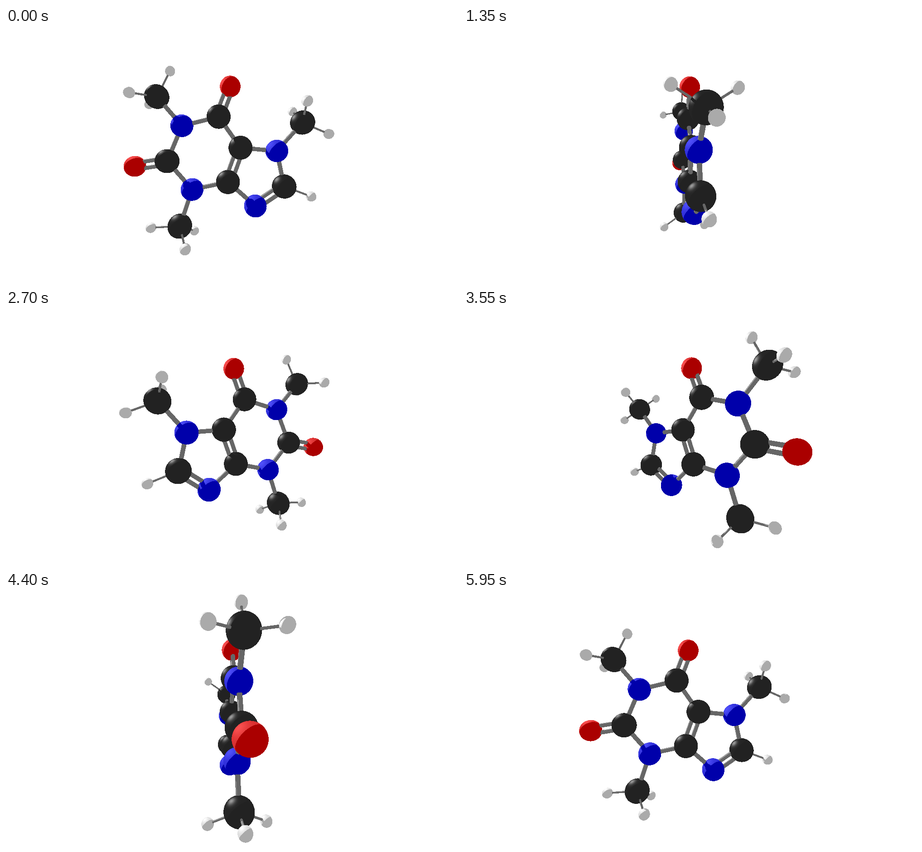
An HTML page with a canvas for the animation above (6000 ms loop, 998x561 px).

```html
<!DOCTYPE html>
<html lang="en">
<head>
<meta charset="utf-8">
<title>Rotating molecule</title>
<style>
html, body { margin: 0; width: 100%; height: 100%; overflow: hidden; background: #fff; }
canvas { display: block; }
</style>
</head>
<body>
<canvas id="stage" width="998" height="561"></canvas>
<script>
const W = 998, H = 561, LOOP = 6000, STEP = 50;
const FOCAL = 486;
const EYE = [0, 0, FOCAL];
const ctx = document.getElementById('stage').getContext('2d');
const image = ctx.createImageData(W, H);
const depth = new Float32Array(W * H);
const owner = new Uint8Array(W * H);

// rgb: shadow colour; flat and gloss: light added where lit
const MATERIAL = {
  C: { r: 26.4, rgb: [34, 34, 34], flat: 3, gloss: 120, power: 24 },
  N: { r: 24.7, rgb: [0, 0, 170], flat: 48, gloss: 32, power: 6 },
  O: { r: 22.8, rgb: [170, 0, 0], flat: 48, gloss: 32, power: 6 },
  H: { r: 11, rgb: [170, 170, 170], flat: 50, gloss: 35, power: 6 },
  bond: { rgb: [102, 102, 102], flat: 20, gloss: 50, power: 6 }
};

const ATOMS = {
  N1: [-110.5, 64.5, 0], C2: [-143, -13.5, 0], N3: [-88, -76, 0],
  C4: [-9, -59.5, 0], C5: [18.7, 16, 0], C6: [-29.5, 84.5, 0],
  N7: [98.7, 9, 0], C8: [115, -69.3, 0], N9: [51.5, -112.3, 0],
  O2: [-214, -25, 0], O6: [-4, 151, 0],
  Ca: [-165.7, 128.7, 0], Cb: [-115, -156.7, 0], Cc: [155.5, 71.5, 0],
  H8: [174.5, -91.5, 0],
  Ha1: [-137, 185.5, 0], Ha2: [-203, 123.5, 52], Ha3: [-203, 123.5, -52],
  Hb1: [-179, -160.5, 0], Hb2: [-92, -185.5, 53], Hb3: [-92, -185.5, -53],
  Hc1: [213.7, 46.5, 0], Hc2: [148, 106.5, 53], Hc3: [148, 106.5, -53]
};
const SINGLE = 'N1-C2 C2-N3 N3-C4 C4-N9 C5-C6 C6-N1 C5-N7 N7-C8 N1-Ca N3-Cb N7-Cc';
const DOUBLE = 'C4-C5 N9-C8 C6-O6 C2-O2';
const HYDROGEN = 'C8-H8 Ca-Ha1 Ca-Ha2 Ca-Ha3 Cb-Hb1 Cb-Hb2 Cb-Hb3 Cc-Hc1 Cc-Hc2 Cc-Hc3';

const dot = (a, b) => a[0] * b[0] + a[1] * b[1] + a[2] * b[2];
const along = (a, b, k) => [a[0] + b[0] * k, a[1] + b[1] * k, a[2] + b[2] * k];
const unit = v => along([0, 0, 0], v, 1 / Math.hypot(...v));
const LIGHT = unit([-1, 1, -1]);

const parts = [];
for (const [name, at] of Object.entries(ATOMS)) {
  const mat = MATERIAL[name[0]];
  parts.push({ from: at, to: at, r: mat.r, mat });
}
function addBonds(list, r, offsets) {
  for (const pair of list.split(' ')) {
    const [p, q] = pair.split('-').map(name => ATOMS[name]);
    const dir = unit(along(q, p, -1));
    const side = [-dir[1], dir[0], 0];
    for (const k of offsets) {
      parts.push({ from: along(p, side, k), to: along(q, side, k), r, mat: MATERIAL.bond });
    }
  }
}
addBonds(SINGLE, 4.8, [0]);
addBonds(DOUBLE, 4.6, [-7.3, 7.3]);
addBonds(HYDROGEN, 2.1, [0]);

function turn([x, y, z], c, s) {
  return [x * c - z * s, y, x * s + z * c];
}

// A sphere is a tube whose axis is zero.
function place(part, c, s) {
  part.a = turn(part.from, c, s);
  part.b = turn(part.to, c, s);
  const axis = along(part.b, part.a, -1);
  part.len = Math.hypot(...axis);
  part.n = part.len ? unit(axis) : axis;
}

// Distance along the ray to the near side of a part, or 0.
function hit(part, o, v) {
  const { a, n, r, len } = part;
  const wx = o[0] - a[0], wy = o[1] - a[1], wz = o[2] - a[2];
  const vn = dot(v, n);
  const wn = wx * n[0] + wy * n[1] + wz * n[2];
  const qa = dot(v, v) - vn * vn;
  const qb = v[0] * wx + v[1] * wy + v[2] * wz - vn * wn;
  const qc = wx * wx + wy * wy + wz * wz - wn * wn - r * r;
  const disc = qb * qb - qa * qc;
  if (disc < 0) return 0;
  const t = (-qb - Math.sqrt(disc)) / qa;
  const h = wn + t * vn;
  return t > 0 && h >= 0 && h <= len ? t : 0;
}

const rayAt = (x, y) => [x + 0.5 - W / 2, H / 2 - y - 0.5, -FOCAL];

function raster(part, id) {
  const box = [part.a, part.b].map(([x, y, z]) => {
    const k = FOCAL / (FOCAL - z);
    const pad = part.r * FOCAL / (FOCAL - z - part.r) * 1.35 + 2;
    return [W / 2 + x * k, H / 2 - y * k, pad];
  });
  const low = i => Math.max(0, Math.floor(Math.min(...box.map(p => p[i] - p[2]))));
  const high = (i, max) => Math.min(max, Math.ceil(Math.max(...box.map(p => p[i] + p[2]))));
  const x0 = low(0), x1 = high(0, W), y0 = low(1), y1 = high(1, H);
  for (let y = y0; y < y1; y++) {
    for (let x = x0; x < x1; x++) {
      const t = hit(part, EYE, rayAt(x, y));
      const i = y * W + x;
      if (t && t < depth[i]) {
        depth[i] = t;
        owner[i] = id;
      }
    }
  }
}

function lightOn(part, p, ray) {
  const rel = along(p, part.a, -1);
  const normal = unit(along(rel, part.n, -dot(rel, part.n)));
  if (dot(normal, LIGHT) <= 0) return 0;
  if (parts.some(other => other !== part && hit(other, p, LIGHT))) return 0;
  const half = unit(along(LIGHT, unit(ray), -1));
  const { flat, gloss, power } = part.mat;
  return flat + gloss * Math.max(0, dot(normal, half)) ** power;
}

function draw(time) {
  const angle = time / LOOP * 2 * Math.PI;
  const c = Math.cos(angle), s = Math.sin(angle);
  depth.fill(Infinity);
  owner.fill(0);
  image.data.fill(255);
  parts.forEach(part => place(part, c, s));
  parts.forEach((part, i) => raster(part, i + 1));
  for (let i = 0; i < owner.length; i++) {
    if (!owner[i]) continue;
    const part = parts[owner[i] - 1];
    const ray = rayAt(i % W, Math.floor(i / W));
    const light = lightOn(part, along(EYE, ray, depth[i]), ray);
    for (let k = 0; k < 3; k++) image.data[i * 4 + k] = part.mat.rgb[k] + light;
  }
  ctx.putImageData(image, 0, 0);
}

const start = performance.now();
let shown = -1;
function tick() {
  const time = Math.floor((performance.now() - start) % LOOP / STEP) * STEP;
  if (time !== shown) draw(shown = time);
  requestAnimationFrame(tick);
}
tick();
</script>
</body>
</html>
```
